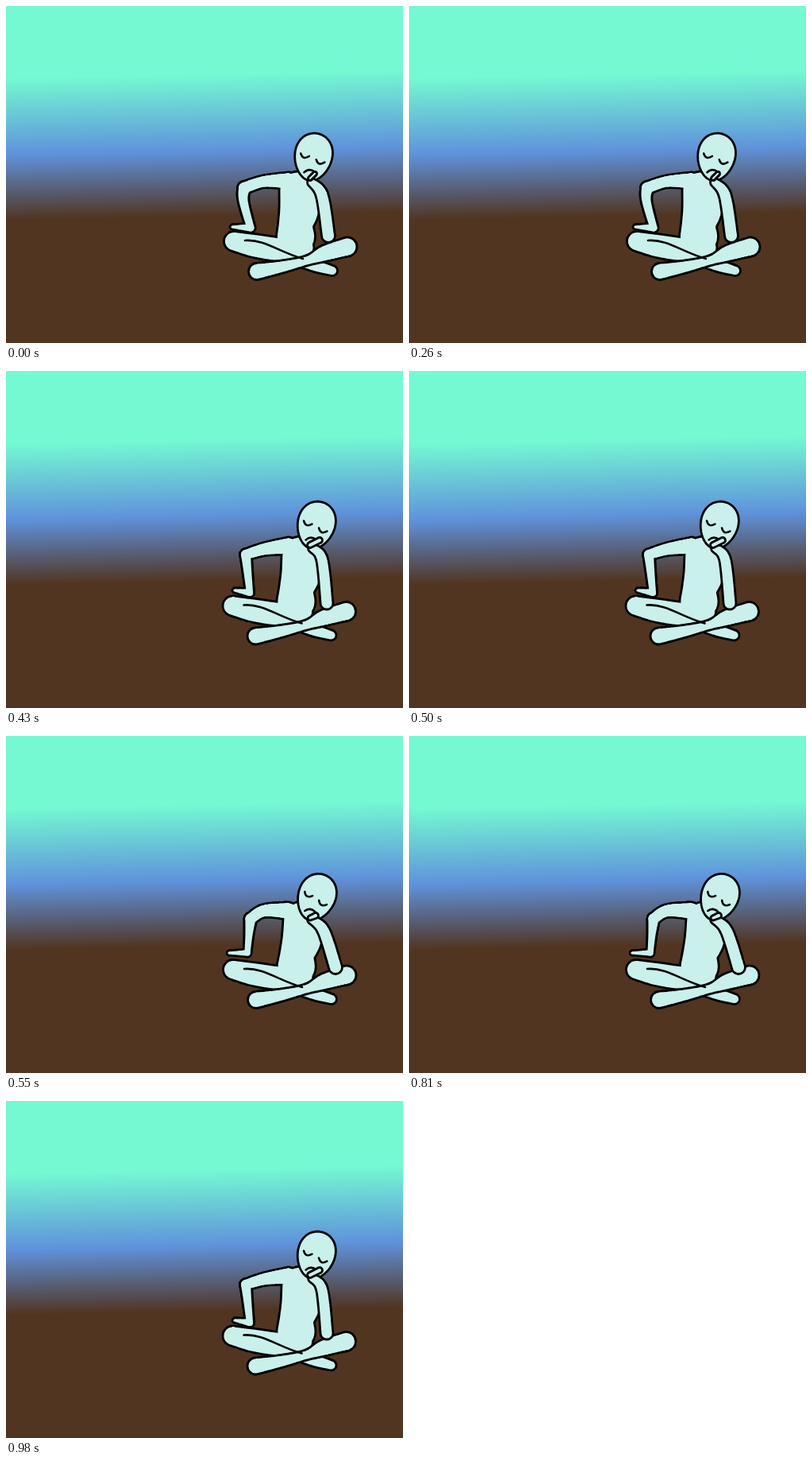
Write an HTML page with a canvas that moves like this. It is 500 px wide and 424 px high and loops after 1100 ms.

```html
<!DOCTYPE html>
<html lang="en">
<head>
<meta charset="utf-8">
<title>Thinking figure</title>
<style>
html, body { margin: 0; width: 100%; height: 100%; overflow: hidden; background: #513521; }
canvas { display: block; width: 500px; height: 424px; }
</style>
</head>
<body>
<canvas id="stage" width="500" height="424"></canvas>
<script>
const ctx = document.getElementById('stage').getContext('2d');
const INK = '#000', SKIN = '#caf0ec', HALF = 1.4;

// Key joints are [x, y, radius]; the head is [x, y, tilt in degrees]
const poses = [
  {
    lean: 0, sit: [0, 0], head: [387, 190, 10],
    elbow: [300, 229, 8.5], bend: [324, 221, 8], forearm: [299, 245, 7], wrist: [308, 279, 6], fingers: [285, 278, 3],
    chin: [385, 222, 5.5], cuff: [398, 238, 8], elbowR: [406, 289, 8.5], finger: [[383, 217, 2.5], [389, 211, 2.5]]
  },
  {
    lean: 3, sit: [-1.5, -0.5], head: [390.5, 194, 14],
    elbow: [302, 231, 7.5], bend: [326, 224, 8.5], forearm: [304, 250, 6.5], wrist: [307, 279, 5.5], fingers: [288, 276, 3],
    chin: [386, 223, 5.5], cuff: [398, 237, 7.5], elbowR: [404, 292, 8], finger: [[383, 219, 3.5], [395, 213, 3.5]]
  },
  {
    lean: 5, sit: [-1, -2], head: [391, 203, 20],
    elbow: [308, 230, 8], bend: [325, 220, 8.5], forearm: [306, 250, 6], wrist: [304, 273, 5], fingers: [281, 273, 3],
    chin: [385, 231, 5.5], cuff: [400, 245, 8], elbowR: [415, 291, 8.5], finger: [[383, 229, 3], [390, 226, 3.5]]
  }
];

const thigh = [[287, 296, 12.5], [315, 302, 15], [345, 306, 15], [376, 304, 12]];
const shin = [[316, 334, 10.5], [348, 328, 8], [380, 320, 6.5], [402, 311, 10.5], [430, 303, 12]];
const foot = [[372, 325, 4], [392, 328, 7.5], [411, 333, 6.5]];
const trunk = [[368, 232, 24], [369.5, 254, 25.5], [365, 274, 22.5], [365, 290, 24.5]];

const moved = (pts, [dx, dy]) => pts.map(([x, y, r]) => [x + dx, y + dy, r]);
const leaned = (pts, lean) => pts.map(([x, y, r]) => [x + lean * (300 - y) / 70, y, r]);

const mix = (a, b, c, d, t) =>
  b + t * (c - a + t * (2 * a - 5 * b + 4 * c - d + t * (3 * (b - c) + d - a))) / 2;

// A limb is a disc swept along a smooth spine
function limb(pts, grow, color) {
  const at = i => pts[Math.max(0, Math.min(pts.length - 1, i))];
  ctx.fillStyle = color;
  ctx.beginPath();
  for (let s = 0; s <= (pts.length - 1) * 40; s++) {
    const i = Math.floor(s / 40), t = s / 40 - i;
    const [x, y, r] = [0, 1, 2].map(k => mix(at(i - 1)[k], at(i)[k], at(i + 1)[k], at(i + 2)[k], t));
    ctx.moveTo(x, y);
    ctx.arc(x, y, r + grow, 0, 7);
  }
  ctx.fill();
}

// Limbs merged under one outline; covers hide inner lines
function merge(limbs, covers = []) {
  limbs.forEach(l => limb(l, HALF, INK));
  [...limbs, ...covers].forEach(l => limb(l, -HALF, SKIN));
}

function line(d) {
  ctx.lineWidth = 2.6;
  ctx.strokeStyle = INK;
  ctx.lineCap = 'round';
  ctx.stroke(new Path2D(d));
}

function drawHead([x, y, tilt]) {
  ctx.save();
  ctx.translate(x, y);
  ctx.rotate(tilt * Math.PI / 180);
  ctx.beginPath();
  for (let a = 0; a < 2 * Math.PI; a += 0.05) {
    ctx.lineTo(23.5 * Math.cos(a) * (1 - 0.12 * Math.sin(a)), 30 * Math.sin(a));
  }
  ctx.closePath();
  ctx.fillStyle = SKIN;
  ctx.fill();
  ctx.lineWidth = 2 * HALF;
  ctx.strokeStyle = INK;
  ctx.stroke();
  for (const [ex, ey] of [[-10.8, 1.4], [9.8, 5.6]]) {
    ctx.save();
    ctx.translate(ex, ey);
    line('M-5.5,-3 Q-1.5,5 5.5,-1.5');
    ctx.restore();
  }
  line('M-8,21 Q-3,14 5,18');
  ctx.restore();
}

function drawSky() {
  const sky = ctx.createLinearGradient(0, 0, 8.48, 424);
  sky.addColorStop(0.215, '#74f9d2');
  sky.addColorStop(0.44, '#5f93dc');
  sky.addColorStop(0.635, '#513521');
  ctx.fillStyle = sky;
  ctx.fillRect(0, 0, 500, 424);
}

function drawFigure(p) {
  const upper = [[356, 220, 11], p.bend, p.elbow];
  const lower = [p.elbow, p.forearm, p.wrist];
  merge([moved(foot, p.sit)]);
  merge([moved(thigh, p.sit), leaned(trunk, p.lean), upper, lower]);
  merge([moved(shin, p.sit)]);
  ctx.save();
  ctx.translate(...p.sit);
  line('M301,295 C325,293 345,310 374,318');
  ctx.restore();
  merge([lower, [p.wrist, p.fingers]], [upper]);
  drawHead(p.head);
  merge([[p.chin, p.cuff, p.elbowR]]);
  merge([p.finger]);
}

const steps = [[0, 0], [430, 1], [550, 2], [980, 1]];
const start = performance.now();

function draw() {
  const t = (performance.now() - start) % 1100;
  drawSky();
  drawFigure(poses[steps.filter(s => s[0] <= t).pop()[1]]);
  requestAnimationFrame(draw);
}
draw();
</script>
</body>
</html>
```
